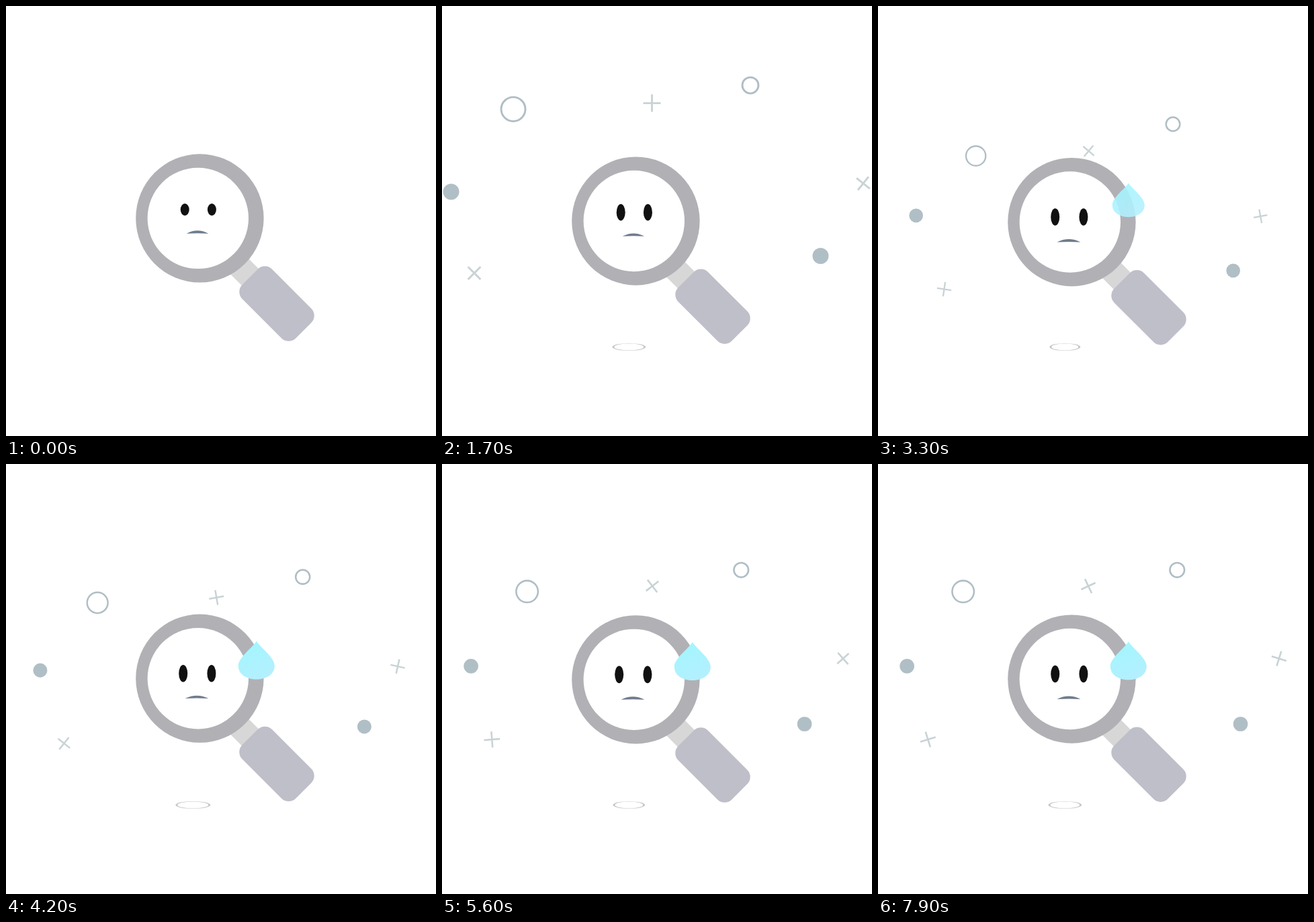
These frames come from a looping animation (640x640 px, 8000 ms). An HTML page with a canvas:

```html
<!DOCTYPE html>
<html lang="en">
<head>
<meta charset="utf-8">
<title>Worried magnifier</title>
<style>
html, body { margin: 0; width: 100%; height: 100%; overflow: hidden; background: #fff; }
canvas { display: block; width: 100vw; height: 100vh; }
</style>
</head>
<body>
<canvas id="stage" width="640" height="640"></canvas>
<script>
const ctx = document.getElementById('stage').getContext('2d');
const LOOP = 8000, BOB = 2400;
const ORIGIN = { x: 318, y: 526 };

const clamp = v => Math.max(0, Math.min(1, v));
const span = (t, a, b) => clamp((t - a) / (b - a));
const mix = (a, b, u) => a + (b - a) * u;
const easeOut = u => 1 - (1 - u) * (1 - u);
const smooth = u => u * u * (3 - 2 * u);

// Two groups differ in how far they fall back before settling.
const FAR = { low: 0.813, settle: [3300, 5100] };
const NEAR = { low: 0.856, settle: [3200, 5400] };

const bits = [
  { kind: 'ring', x: 106, y: 153.5, r: 18, group: FAR },
  { kind: 'ring', x: 459, y: 118, r: 12, group: NEAR },
  { kind: 'dot', x: 13.5, y: 276.5, r: 12, group: NEAR },
  { kind: 'dot', x: 563.5, y: 372, r: 12, group: NEAR },
  { kind: 'cross', x: 312.5, y: 144.5, r: 13, group: FAR, angle: t => 0.0445 * Math.max(0, t - 2400) },
  { kind: 'cross', x: 627, y: 264, r: 12.7, group: FAR, angle: t => 0.0256 * t - 5 },
  { kind: 'cross', x: 48, y: 397.5, r: 13.2, group: FAR, angle: t => 0.0335 * t - 12 }
];

function spread(t, g) {
  if (t < 1700) return t / 1700;
  const [a, b] = g.settle;
  if (t < a) return mix(1, g.low, easeOut(span(t, 1700, a)));
  return mix(g.low, 0.9025, span(t, a, b));
}

function ellipse(x, y, rx, ry, color) {
  ctx.fillStyle = color;
  ctx.beginPath();
  ctx.ellipse(x, y, rx, ry, 0, 0, Math.PI * 2);
  ctx.fill();
}

function drawBit(b, t) {
  const k = spread(t, b.group);
  ctx.save();
  ctx.globalAlpha = span(t, 850, 1550);
  ctx.translate(mix(ORIGIN.x, b.x, k), mix(ORIGIN.y, b.y, k));
  ctx.scale(k, k);
  if (b.kind === 'dot') {
    ellipse(0, 0, b.r, b.r, '#b0bfc5');
  } else {
    ctx.lineWidth = 2.9;
    ctx.strokeStyle = b.kind === 'ring' ? '#b0bec5' : '#c9d3d5';
    ctx.beginPath();
    if (b.kind === 'ring') {
      ctx.arc(0, 0, b.r, 0, Math.PI * 2);
    } else {
      ctx.rotate(b.angle(t) * Math.PI / 180);
      ctx.moveTo(-b.r, 0);
      ctx.lineTo(b.r, 0);
      ctx.moveTo(0, -b.r);
      ctx.lineTo(0, b.r);
    }
    ctx.stroke();
  }
  ctx.restore();
}

function drawShadow(t, wave) {
  if (t < 100) return;
  const rx = 26 + 4.2 * wave;
  ctx.fillStyle = '#c6c6c6';
  ctx.beginPath();
  ctx.ellipse(278.3, 507.5, rx, 5.5, 0, 0, Math.PI * 2);
  ctx.ellipse(278.3, 507.5, rx - 3, 5, 0, 0, Math.PI * 2);
  ctx.fill('evenodd');
}

function drawGlass() {
  ctx.save();
  ctx.translate(403, 127.2);
  ctx.rotate(Math.PI / 4);
  ctx.fillStyle = '#d7d7d7';
  ctx.fillRect(-105, -17.7, 60, 35.4);
  ctx.fillStyle = '#bfbfc9';
  ctx.beginPath();
  ctx.roundRect(-56.3, -31.3, 112.6, 62.6, 15);
  ctx.fill();
  ctx.restore();
  ellipse(288.4, 0, 95.2, 95.6, '#b1b0b5');
  ellipse(285.8, 0, 75.2, 75.2, '#fff');
}

function drawFace(t) {
  const shift = smooth(span(t, 2300, 3100));
  const ry = mix(mix(9, 12.3, span(t, 0, 300)), 12.8, shift);
  const eyeY = mix(-12.9, -7.5, shift);
  ellipse(mix(266.2, 263.7, shift), eyeY, 6.5, ry, '#111');
  ellipse(mix(306.4, 305.9, shift), eyeY, 6.5, ry, '#111');

  const x = mix(285, 284, shift), y = mix(22.8, 29.9, shift), w = mix(16.3, 17.5, shift);
  ctx.fillStyle = '#6f7c8c';
  ctx.beginPath();
  ctx.moveTo(x - w, y);
  ctx.quadraticCurveTo(x, y - 8.8, x + w, y);
  ctx.quadraticCurveTo(x, y - 1, x - w, y);
  ctx.fill();
}

function drawDrop(t) {
  const s = easeOut(span(t, 2700, 3600));
  if (s <= 0) return;
  const anchor = -21;
  ctx.save();
  ctx.globalAlpha = s;
  ctx.translate(372.8, -55.8 + anchor);
  ctx.scale(s, s);
  ctx.translate(0, -anchor);
  const g = ctx.createLinearGradient(-12, 8, 12, 57);
  g.addColorStop(0, '#a4f5ff');
  g.addColorStop(1, '#b5effe');
  ctx.fillStyle = g;
  ctx.beginPath();
  ctx.moveTo(0, 0);
  ctx.bezierCurveTo(6, 10, 27, 24, 27, 37);
  ctx.bezierCurveTo(27, 50, 14, 57, 0, 57);
  ctx.bezierCurveTo(-14, 57, -27, 50, -27, 37);
  ctx.bezierCurveTo(-27, 24, -6, 10, 0, 0);
  ctx.fill();
  ctx.restore();
}

function draw(t) {
  const wave = Math.cos(t / BOB * Math.PI * 2);
  ctx.fillStyle = '#fff';
  ctx.fillRect(0, 0, 640, 640);
  for (const b of bits) drawBit(b, t);
  drawShadow(t, wave);
  ctx.save();
  ctx.translate(0, 319.2 - 3.3 * wave);
  drawGlass();
  drawFace(t);
  drawDrop(t);
  ctx.restore();
}

const start = performance.now();
function tick() {
  draw((performance.now() - start) % LOOP);
  requestAnimationFrame(tick);
}
tick();
</script>
</body>
</html>
```
